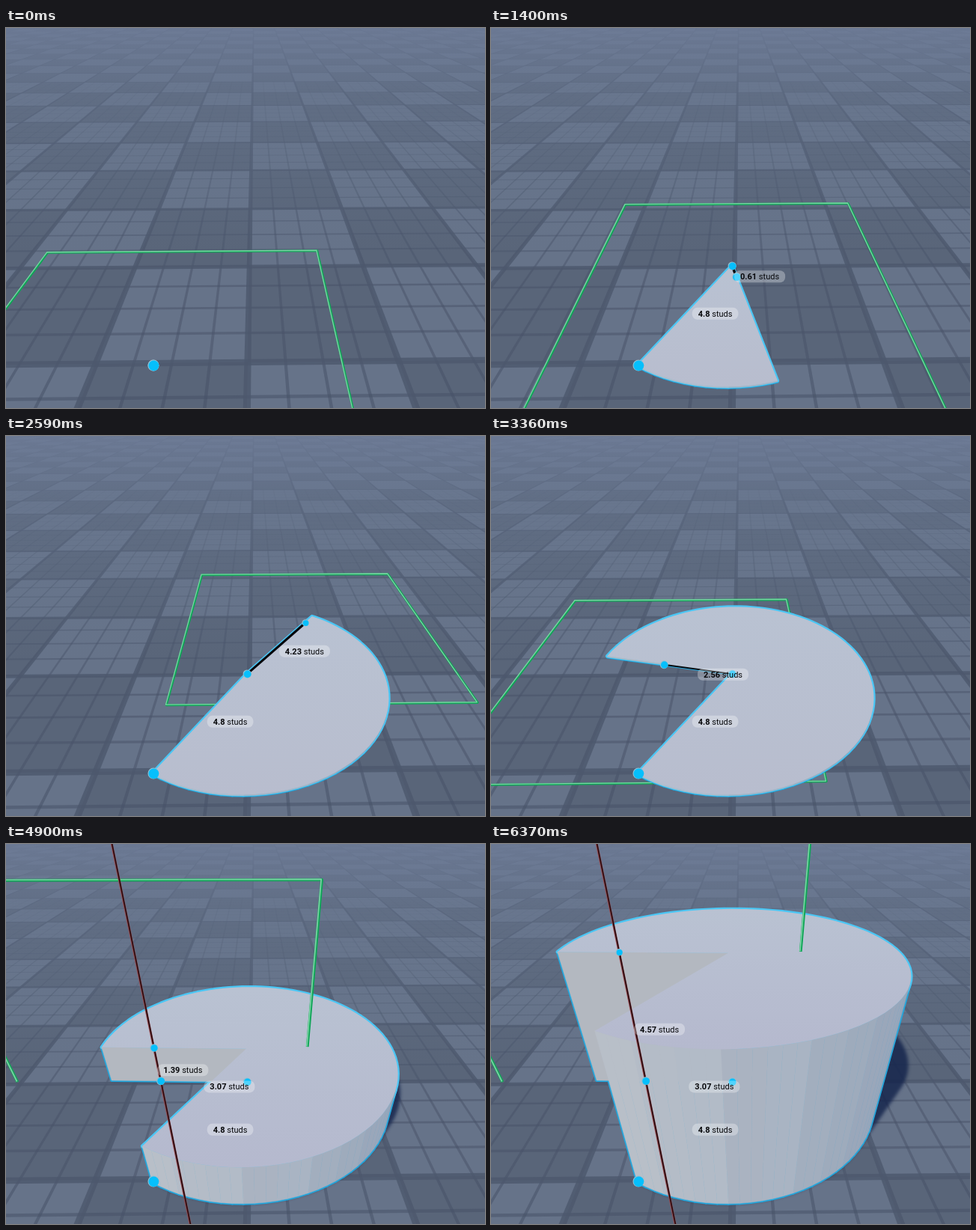
Recreate the animation shown at these times as an HTML page with a canvas. Size 640 by 508 pixels, loop 6440 ms.

```html
<!DOCTYPE html>
<html lang="en">
<head>
<meta charset="utf-8">
<title>Cylinder tool</title>
<style>
html, body { margin: 0; width: 100%; height: 100%; overflow: hidden; background: #5d697e; }
canvas { display: block; width: 640px; height: 508px; }
</style>
</head>
<body>
<canvas id="stage" width="640" height="508"></canvas>
<script>
const W = 640, HT = 508, LOOP = 6440, STEP = 70;
const stage = document.getElementById('stage');
const ctx = stage.getContext('2d');

// World units are studs: x to the right, z away from the viewer, h up.
const START = [-2.47, -4.07], CENTER = [-0.08, 0.04];
const RADIUS = 4.79, FACET = Math.PI / 18;
const A0 = Math.atan2(START[1] - CENTER[1], START[0] - CENTER[0]);
const UNIT = 1.007, HALF = 4.97;
const SWEEP_AT = 1050, RAISE_AT = 4340;

// time, x, z
const CURSOR = [
  [70, ...START], [210, -2.15, -3.55], [420, -1.3, -2.1], [630, -0.45, -0.6],
  [770, -0.16, -0.17], [840, -0.13, -0.12], [980, -0.08, 0.1], [1050, ...CENTER],
  [1190, -0.06, -0.1], [1330, 0.02, -0.35], [1470, 0.13, -0.75], [1680, 0.27, -1.9],
  [1890, 0.39, -2.83], [2030, 1.25, -2.6], [2170, 2.55, -1.4], [2310, 3.3, 0.3],
  [2450, 3.1, 2.2], [2590, 2.35, 3.47], [2730, 0.3, 3.25], [2870, -1.9, 1.75],
  [2940, -2.45, 0.85], [3080, -2.5, 0.68], [3150, -2.5, 0.68], [3360, -2.56, 0.6],
  [3570, -2.75, 0.45], [3640, -2.75, 0.45], [3850, -3, 0.25], [4130, -3.13, 0.13]
];
// time, height
const HEIGHT = [
  [4270, 0], [4480, 0.33], [4550, 0.33], [4620, 0.42], [4900, 1.39], [5250, 2.95],
  [5600, 3.9], [5950, 4.6], [6160, 4.7], [6370, 4.57]
];

function sample(keys, t) {
  if (t <= keys[0][0]) return keys[0].slice(1);
  const i = keys.findIndex(k => k[0] >= t);
  if (i < 0) return keys[keys.length - 1].slice(1);
  const a = keys[i - 1], b = keys[i], u = (t - a[0]) / (b[0] - a[0]);
  return a.slice(1).map((v, n) => v + (b[n + 1] - v) * u);
}

const depth = (x, z) => 1 + z / 16.2 + 0.0007 * x;

// Perspective by vanishing points: depth (332,-71), vertical (342,973).
function project(x, z, h = 0) {
  const g = depth(x, z), e = -0.0457 * h, w = g + e;
  return [(332 * g - 6.8 + 38.1 * x + 342 * e) / w, (-71 * g + 390 + 973 * e) / w];
}

function trace(c, pts, close = true) {
  pts.forEach((p, i) => i ? c.lineTo(...p) : c.moveTo(...p));
  if (close) c.closePath();
}

function fill(c, pts, color) {
  c.beginPath();
  trace(c, pts);
  c.fillStyle = color;
  c.fill();
}

function stroke(pts, color, width, close = false) {
  ctx.beginPath();
  trace(ctx, pts, close);
  ctx.strokeStyle = color;
  ctx.lineWidth = width;
  ctx.stroke();
}

const rect = (x0, z0, x1, z1) =>
  [project(x0, z0), project(x1, z0), project(x1, z1), project(x0, z1)];

function makeGround() {
  const cv = document.createElement('canvas');
  cv.width = W;
  cv.height = HT;
  const c = cv.getContext('2d');
  c.fillStyle = '#5d697e';
  c.fillRect(0, 0, W, HT);
  const X = 60, NEAR = -8, FAR = 84;
  for (let i = -15; i < 15; i++)
    for (let j = -2; j < 21; j++)
      fill(c, rect(4 * i, 4 * j, 4 * i + 4, 4 * j + 4), (i + j) % 2 ? '#596579' : '#667389');
  // Thin lines fade out with distance.
  for (let z = NEAR; z < 28; z += 4) {
    const thin = `rgba(72,83,104,${0.55 - 0.45 * (z - NEAR) / 36})`;
    for (let x = -40; x <= 40; x++)
      if (x % 4) fill(c, rect(x - 0.04, z, x + 0.04, z + 4), thin);
    for (let k = 1; k < 4; k++) fill(c, rect(-X, z + k - 0.045, X, z + k + 0.045), thin);
  }
  const seam = 'rgba(77,88,109,.8)';
  for (let n = -X; n <= X; n += 4) fill(c, rect(n - 0.09, NEAR, n + 0.09, FAR), seam);
  for (let n = NEAR; n <= FAR; n += 4) fill(c, rect(-X, n - 0.1, X, n + 0.1), seam);
  const haze = c.createLinearGradient(0, 0, 0, 300);
  haze.addColorStop(0, 'rgba(110,124,152,.85)');
  haze.addColorStop(0.3, 'rgba(107,122,148,.42)');
  haze.addColorStop(1, 'rgba(104,120,144,0)');
  c.fillStyle = haze;
  c.fillRect(0, 0, W, 300);
  return cv;
}
const ground = makeGround();

function greenLine(pts, width, close) {
  stroke(pts, '#0fa557', width, close);
  stroke(pts.map(([x, y]) => [x - 0.8, y - 0.6]), '#7bd2a4', width * 0.45, close);
}

function wallColor(a, i) {
  const u = ((Math.cos(a) + 1) / 2) ** 1.4, s = i % 2 * 2 + (i % 3 === 0 ? 2 : 0);
  const mix = (p, q) => Math.round(p + (q - p) * u - s);
  return `rgb(${mix(194, 146)},${mix(199, 162)},${mix(206, 184)})`;
}

// Outline of the slice: the centre, then three rim points per facet.
function slice(sweep) {
  const plan = [CENTER], n = Math.max(1, Math.ceil(sweep / FACET)) * 3;
  for (let k = 0; k <= n; k++) {
    const a = A0 + Math.min(sweep, k * FACET / 3);
    plan.push([CENTER[0] + RADIUS * Math.cos(a), CENTER[1] + RADIUS * Math.sin(a)]);
  }
  return plan;
}

function drawShadow(plan, h) {
  ctx.beginPath();
  for (let k = 0; k <= 8; k++)
    trace(ctx, plan.map(([x, z]) => project(x + 0.45 * h * k / 8, z + 0.56 * h * k / 8)));
  ctx.filter = 'blur(2px)';
  ctx.fillStyle = 'rgba(18,34,74,.8)';
  ctx.fill();
  ctx.filter = 'none';
}

function drawSolid(plan, h) {
  const base = plan.map(p => project(...p)), top = plan.map(p => project(...p, h));
  const walls = [];
  for (let i = plan.length - 1; i >= 0; i--) {
    const j = (i + 1) % plan.length, a = base[i], b = base[j], c = top[i];
    if ((b[0] - a[0]) * (c[1] - a[1]) - (b[1] - a[1]) * (c[0] - a[0]) >= 0) continue;
    const k = Math.floor((i - 1) / 3);
    walls.push({
      pts: [a, b, top[j], c],
      color: j === 0 ? '#b3b8c0' : wallColor(A0 + (k + 0.5) * FACET, k)
    });
  }
  ctx.lineJoin = 'round';
  for (const f of walls) stroke(f.pts, '#22a6dc', 4, true);
  stroke(top, '#4ac6f4', 4.4, true);
  for (const f of walls) {
    fill(ctx, f.pts, f.color);
    stroke(f.pts, f.color, 0.5, true);
  }
  const ys = top.map(p => p[1]), y0 = Math.min(...ys), y1 = Math.max(...ys, y0 + 1);
  const g = ctx.createLinearGradient(0, y0, 0, y1);
  g.addColorStop(0, '#b9c2d2');
  g.addColorStop(1, h > 0.1 ? '#b5b9ce' : '#b8bdce');
  fill(ctx, top, g);
}

function dot([x, y], r) {
  const disc = (cx, cy, rad, color) => {
    ctx.beginPath();
    ctx.arc(cx, cy, rad, 0, 7);
    ctx.fillStyle = color;
    ctx.fill();
  };
  disc(x, y, r, '#8fbfd2');
  disc(x + 0.5, y + 0.3, r - 0.7, '#06bffc');
}
const groundDot = p => dot(project(...p), 5.6 / depth(...p));

function label([x, y], value) {
  const num = String(+value.toFixed(2)), bold = 'bold 11px Roboto, sans-serif', plain = '11px Roboto, sans-serif';
  ctx.font = bold;
  const nw = ctx.measureText(num).width;
  ctx.font = plain;
  const w = nw + ctx.measureText(' studs').width + 16;
  y -= 1;
  ctx.beginPath();
  ctx.roundRect(x, y, w, 16, 7);
  ctx.fillStyle = 'rgba(255,255,255,.3)';
  ctx.fill();
  ctx.fillStyle = '#08090c';
  ctx.fillText(' studs', x + 8 + nw, y + 12);
  ctx.font = bold;
  ctx.fillText(num, x + 8, y + 12);
}

const middle = (a, b) => project((a[0] + b[0]) / 2, (a[1] + b[1]) / 2);
const distance = (a, b) => Math.hypot(a[0] - b[0], a[1] - b[1]);

function ruler(a, b, width) {
  const mid = depth((a[0] + b[0]) / 2, (a[1] + b[1]) / 2);
  stroke([project(...a), project(...b)], '#05060b', width / mid);
}

function draw(t) {
  const cur = sample(CURSOR, t), [h] = sample(HEIGHT, t), [x, z] = cur;
  const sweeping = t >= SWEEP_AT, raising = t >= RAISE_AT;
  const from = sweeping ? CENTER : START, len = distance(from, cur);
  ctx.drawImage(ground, 0, 0);

  if (!raising) greenLine(rect(x - HALF, z - HALF, x + HALF, z + HALF), 3, true);
  if (sweeping) {
    const a = Math.atan2(z - CENTER[1], x - CENTER[0]) - A0;
    const sweep = len < 0.05 ? 0 : (a + 4 * Math.PI) % (2 * Math.PI);
    const plan = slice(sweep);
    if (raising) drawShadow(plan, h);
    drawSolid(plan, Math.max(h, 0.04));
    if (!raising && len > 0.05) ruler(CENTER, cur, sweep > 4 ? 1.9 : 3.4);
  } else if (len > 0.05) {
    ruler(START, cur, 3.3);
  }

  if (raising) {
    const l = x - 5.02, r = x + 5.08, up = h + 5;
    greenLine([project(l, z), project(l, z, up), project(r, z, up), project(r, z, h)], 3.8);
    const axis = [project(x, z, -13), project(x, z, 11)];
    stroke(axis, '#96474e', 3);
    stroke(axis.map(([u, v]) => [u + 0.3, v]), '#240a0d', 1.6);
  }

  groundDot(START);
  if (sweeping) groundDot(CENTER);
  groundDot(cur);
  if (raising) dot(project(x, z, h), 5.6 - 0.2 * h);

  if (sweeping) label(middle(START, CENTER), 4.8);
  if (len > 0.05) label(middle(from, cur), len * UNIT);
  if (raising) label(project(x, z, h / 2), h);
}

const begin = performance.now();
function tick() {
  const t = Math.max(0, performance.now() - begin) % LOOP;
  draw(Math.floor(t / STEP) * STEP);
  requestAnimationFrame(tick);
}
tick();
</script>
</body>
</html>
```
